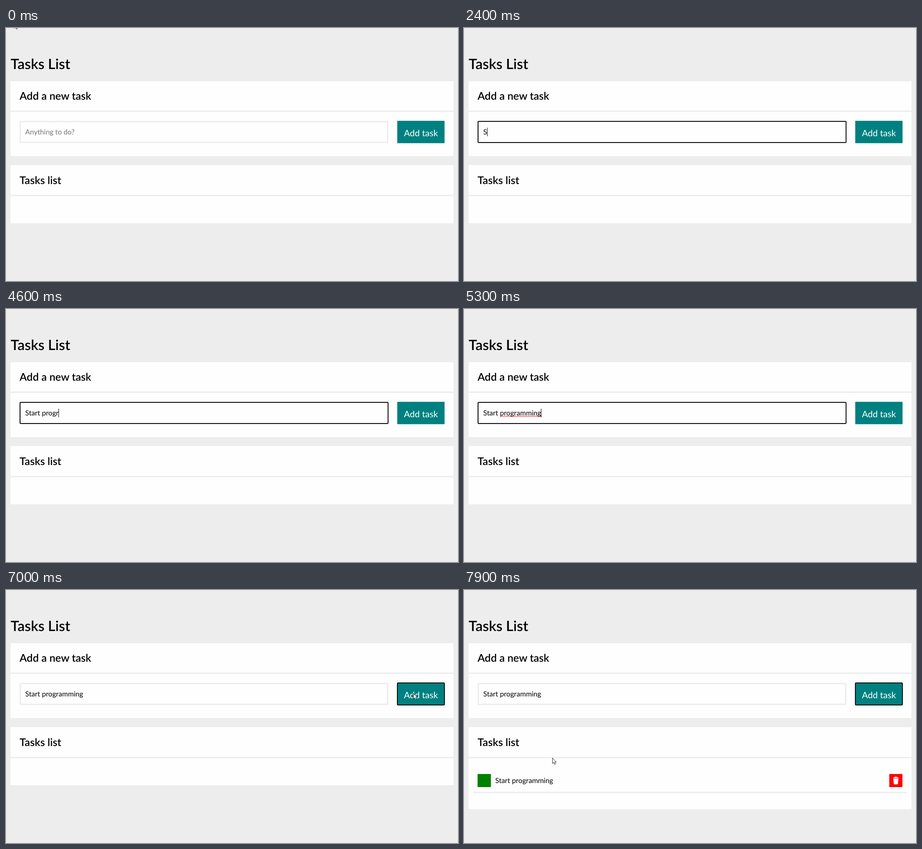
These frames come from a looping animation (999x561 px, 8 s). An HTML page:

```html
<!DOCTYPE html>
<html lang="en">
<head>
<meta charset="utf-8">
<title>Tasks List</title>
<style>
  html, body { margin: 0; width: 100%; height: 100%; overflow: hidden; background: #ededed; }
  svg { display: block; width: 999px; height: 561px; font: 15.7px Lato, sans-serif; }
  text { white-space: pre; text-rendering: geometricPrecision; }
  .title { font-size: 31.4px; font-weight: 600; }
  .heading { font-size: 23.5px; font-weight: 600; }
  .label { font-size: 19.6px; fill: #fff; }
  .panel { fill: #fefefe; }
  .line { fill: #ededed; }
  .ring { fill: none; stroke: #101010; stroke-width: 2; }
</style>
</head>
<body>
<svg viewBox="0 0 999 561">
  <text class="title" x="10.3" y="91">Tasks List</text>

  <rect class="panel" x="10" y="118" width="979" height="166"/>
  <rect class="line" x="10" y="183" width="979" height="3"/>
  <text class="heading" x="30" y="159.4">Add a new task</text>
  <rect class="panel" x="31.5" y="207.5" width="812" height="46" stroke="#ededed" stroke-width="3"/>
  <rect id="inputRing" class="ring" x="31" y="207" width="813.5" height="47" rx="2"/>
  <text id="field" x="42.5" y="236.3"></text>
  <path id="squiggle" fill="none" stroke="#f00"/>
  <rect id="caret" y="221" width="1" height="19"/>
  <rect x="864.7" y="205.8" width="104.6" height="49.6" fill="#008080"/>
  <rect id="buttonRing" class="ring" x="865" y="206" width="104" height="49" rx="2"/>
  <text class="label" x="879.5" y="239.5">Add task</text>

  <rect id="list" class="panel" x="10" y="304" width="979"/>
  <rect class="line" x="10" y="370" width="979" height="3"/>
  <text class="heading" x="30" y="346">Tasks list</text>
  <g id="item">
    <rect x="30" y="408" width="29.5" height="29" fill="#008000"/>
    <text x="69" y="428.3">Start programming</text>
    <rect x="940" y="408" width="29" height="29" fill="#f00"/>
    <path d="M948 417l1-1.5 3-.5 1-1h3l1 1 3 .5 1 1.5zM948.7 418h11.6l-1.3 12q-.2 1-1.5 1h-6q-1.3 0-1.5-1z" fill="#fff"/>
    <rect class="line" x="20" y="447.5" width="959.5" height="3"/>
  </g>

  <path id="mouse" d="M.5 .5V12.8L3.2 10.2L5.2 14.6L7.2 13.7L5.3 9.4H8.9Z" fill="#fff" stroke="#111" stroke-width=".9"/>
</svg>
<script>
const $ = id => document.getElementById(id);
const show = (id, on) => $(id).setAttribute('visibility', on ? 'visible' : 'hidden');

const LOOP = 8000, STEP = 100, BLINK = 530;
const FOCUS = 1370, TYPED = 5300, PRESS = 7000, RELEASE = 7100;

// Each burst types its letters at an even pace.
const bursts = [
  { text: 'Start ', start: 2370, end: 3370 },
  { text: 'prog', start: 4000, end: 4300 },
  { text: 'ramming', start: 4600, end: TYPED }
];

const smooth = k => k * k * (3 - 2 * k);
const easeOut = k => 1 - (1 - k) ** 2;

const moves = [
  { start: 200, end: 900, from: [18, -12], to: [165, 190], ease: smooth },
  { start: 6300, end: 6600, from: [856, 221], to: [900, 229], ease: easeOut },
  { start: 7300, end: 7700, from: [900, 229], to: [309, 312], ease: smooth },
  { start: 7800, end: 7900, from: [309, 312], to: [195, 372], ease: smooth }
];

function typing(t) {
  let text = '', lastKey = FOCUS;
  for (const burst of bursts) {
    if (t < burst.start) break;
    const pace = (burst.end - burst.start) / (burst.text.length - 1);
    const last = Math.floor((Math.min(t, burst.end) - burst.start) / pace + 1e-6);
    text += burst.text.slice(0, last + 1);
    lastKey = burst.start + last * pace;
  }
  return { text, lastKey };
}

function pointerAt(t) {
  const { start, end, from, to, ease } = moves.findLast(m => t >= m.start) ?? moves[0];
  const k = ease(Math.min(Math.max((t - start) / (end - start), 0), 1));
  return from.map((v, i) => v + (to[i] - v) * k);
}

function squigglePath(from, to) {
  let d = `M${from} 238.5`;
  for (let x = from + 2; x <= to; x += 2) d += `L${x} ${x % 4 ? 237 : 239}`;
  return d;
}

function render(now) {
  const t = Math.floor(now % LOOP / STEP) * STEP;
  const { text, lastKey } = typing(t);
  const focused = t >= FOCUS && t < PRESS;
  const field = $('field');

  field.textContent = text || 'Anything to do?';
  field.setAttribute('fill', text ? '#000' : '#757575');
  $('caret').setAttribute('x', Math.round(42 + (text && field.getComputedTextLength())));
  show('caret', focused && Math.floor((t - lastKey) / BLINK) % 2 === 0);

  show('inputRing', focused);
  show('squiggle', focused && t >= TYPED);
  show('buttonRing', t >= PRESS);
  show('item', t >= RELEASE);
  $('list').setAttribute('height', t >= RELEASE ? 182 : 129);

  // The pointer is hidden while over the text field.
  show('mouse', t <= moves[0].end || t >= moves[1].start);
  $('mouse').setAttribute('transform', `translate(${pointerAt(t)})`);
  requestAnimationFrame(render);
}

$('squiggle').setAttribute('d', squigglePath(80, 172));
requestAnimationFrame(render);
</script>
</body>
</html>
```
